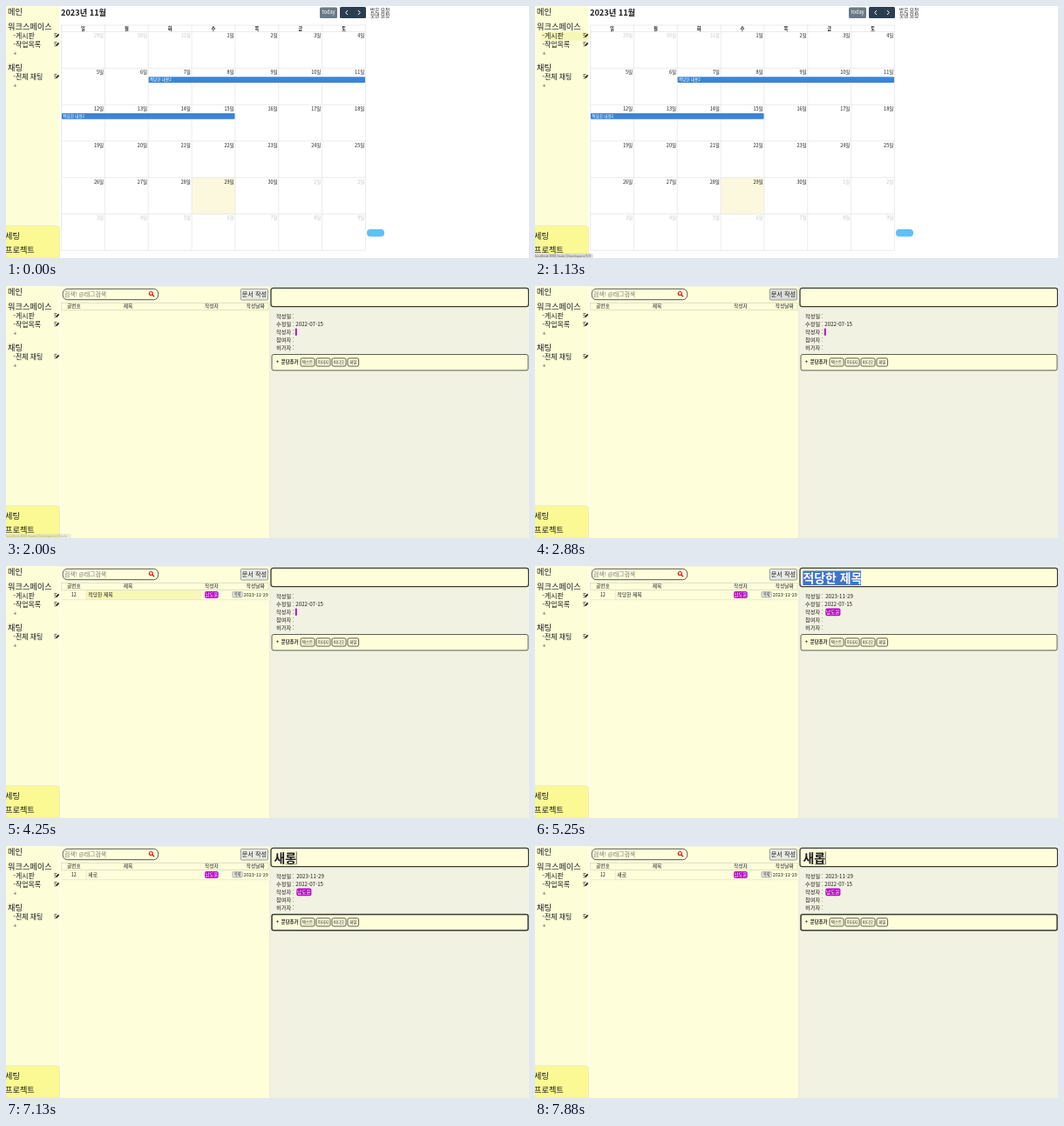
These frames come from a looping animation (600 px wide and 289 px high, 8 s). An HTML page:

```html
<!DOCTYPE html>
<html lang="ko">
<head>
<meta charset="utf-8">
<style>
html, body { margin: 0; width: 100%; height: 100%; overflow: hidden; background: #fff; }
svg { display: block; width: 600px; height: 289px; }
text { font-family: 'Noto Sans CJK KR', 'Noto Sans CJK', 'Noto Sans CJK JP', sans-serif; white-space: pre; }
</style>
</head>
<body>
<svg id="stage" viewBox="0 0 600 289"></svg>
<script>
const NS = 'http://www.w3.org/2000/svg';
const LOOP = 8000;
const stage = document.getElementById('stage');
const CREAM = '#fefedb', INK = '#1c1c1c', PURPLE = '#b50fc0';
const AUTHOR = '남도윤', DRAFT = '적당한 제목';

function add(parent, tag, attrs, str) {
  const el = document.createElementNS(NS, tag);
  for (const k in attrs) el.setAttribute(k, attrs[k]);
  if (str !== undefined) el.textContent = str;
  parent.appendChild(el);
  return el;
}
const group = (parent = stage) => add(parent, 'g', {});
const box = (p, x, y, x2, y2, fill, more = {}) =>
  add(p, 'rect', { x, y, width: x2 - x, height: y2 - y, fill, ...more });
const line = (p, d, stroke, width = 1, more = {}) =>
  add(p, 'path', { d, stroke, 'stroke-width': width, fill: 'none', ...more });
// y is the visual middle of the line
const label = (p, x, y, str, size, more = {}) =>
  add(p, 'text', { x, y: y + size * 0.37, 'font-size': size, fill: INK, ...more }, str);
const MID = { 'text-anchor': 'middle' };
const END = { 'text-anchor': 'end' };
const BOLD = { 'font-weight': 700 };
const WHITE = { fill: '#fff' };

// Calendar page
const calendar = group();
const calX = i => 63.5 + i * 49.85;
const calY = i => 29.5 + i * 41.8;

label(calendar, 63, 7.5, '2023년 11월', 9.2, BOLD);
box(calendar, 360, 1.5, 380, 14, '#6b7986', { rx: 1.5 });
label(calendar, 370, 7.3, 'today', 5.7, { ...MID, ...WHITE });
box(calendar, 383, 1, 413, 14, '#2c3e50', { rx: 1.5 });
line(calendar, 'M398 1V14', '#25364a', 0.6);
line(calendar, 'M392 5l-2.3 2.5l2.3 2.5M404 5l2.3 2.5l-2.3 2.5', '#fff', 1);

box(calendar, calX(3), calY(4), calX(4), calY(5), '#fbf8dd');
let grid = `M${calX(0)} 22H${calX(7)}`;
for (let i = 0; i < 7; i++) grid += `M${calX(0)} ${calY(i)}H${calX(7)}`;
for (let i = 0; i < 8; i++) grid += `M${calX(i)} 22V${calY(6)}`;
line(calendar, grid, '#e2e2e2', 0.7);

[...'일월화수목금토'].forEach((d, i) =>
  label(calendar, calX(i + 0.5), 25.9, d, 5.2, { ...MID, ...BOLD }));
for (let i = 0; i < 42; i++) {
  const date = new Date(2023, 9, 29 + i);
  const fill = date.getMonth() === 10 ? INK : '#c6c6c6';
  label(calendar, calX(i % 7 + 1) - 1.2, calY(Math.floor(i / 7)) + 4.8,
    date.getDate() + '일', 5.5, { ...END, fill });
}
for (const [from, to, row] of [[2, 7, 1], [0, 4, 2]]) {
  const y = calY(row) + 9.9;
  box(calendar, calX(from) + 0.4, y, calX(to) - 0.4, y + 6.8, '#3b84d6', { rx: 0.8 });
  label(calendar, calX(from) + 1.7, y + 3.4, '적당한 내용2', 4.6, WHITE);
}
label(calendar, 418, 4.8, '받은 요청', 5.6);
label(calendar, 418, 11, '보낸 요청', 5.6);
box(calendar, 414, 256, 434, 264.5, '#62bff6', { rx: 4 });
label(calendar, 424, 259.5, '· · ·', 4, { ...MID, fill: '#a5dafa' });

// Document page
const docs = group();
box(docs, 61, 0, 600, 289, CREAM);
box(docs, 303, 0, 600, 289, '#f1f2e1');
line(docs, 'M62.3 0V289', '#fff', 1.2);
line(docs, 'M302.7 0V289', '#e4e4d2', 0.8);
line(docs, 'M62 .3H600', '#e6e6d6', 0.6);

box(docs, 65.2, 3.3, 174.6, 15.7, CREAM, { rx: 5, stroke: '#444', 'stroke-width': 0.9 });
label(docs, 67, 9.2, '검색! @태그검색', 6.8, { fill: '#777' });
add(docs, 'circle', { cx: 166.3, cy: 8.5, r: 2, fill: 'none', stroke: '#e01818', 'stroke-width': 1.2 });
line(docs, 'M167.8 10L170 12.2', '#e01818', 1.4);
const newButton = box(docs, 269.4, 3.4, 300.4, 16, '#e9e9e4', { rx: 1, stroke: '#858585', 'stroke-width': 0.8 });
label(docs, 284.9, 9.7, '문서 작성', 7.1, MID);

box(docs, 63.4, 19.4, 301, 27.5, 'none', { stroke: '#d8d8bb', 'stroke-width': 0.7 });
for (const [x, str] of [[70, '글번호'], [134.7, '제목'], [228, '작성자'], [275.7, '작성날짜']])
  label(docs, x, 23.3, str, 5.7);

const row = group(docs);
const rowHover = box(row, 92.4, 28, 224, 38.6, '#f7f7b8');
line(row, 'M63 38.7H301M92.2 28V38.5', '#dedec4', 0.6);
label(row, 77.8, 33, '12', 5.5, MID);
const rowTitle = label(row, 94.3, 33, DRAFT, 5.8);
label(row, 272.8, 33, '2023-11-29', 5.45);
box(row, 260, 29.7, 271, 35.7, '#efefea', { rx: 0.8, stroke: '#777', 'stroke-width': 0.6 });
label(row, 265.5, 32.6, '삭제', 4.2, MID);
chip(row, 228, 29, 243.7, 37, 5.3);

function chip(p, x, y, x2, y2, size) {
  box(p, x, y, x2, y2, PURPLE, { rx: 2 });
  label(p, (x + x2) / 2, (y + y2) / 2 - 0.1, AUTHOR, size, { ...MID, ...WHITE });
}

box(docs, 304, 2.4, 599.5, 23.6, CREAM, { rx: 2.5, stroke: '#3a3a35', 'stroke-width': 1.3 });
const selection = box(docs, 307.3, 5.5, 374, 22, '#3f74c9');
const title = label(docs, 307.5, 13.4, '', 13.9, BOLD);
const caret = group(docs);
const caretBar = line(caret, 'M0 6.5V21', '#222', 0.7);
const caretBase = line(caret, 'M-12.6 21H0', '#555', 0.6);

['작성일 :', '수정일 : 2022-07-15', '작성자 :', '참여자 :', '허가자 :'].forEach((str, i) =>
  label(docs, 310, 34.3 + i * 9.1, str, 6.2));
const emptyChip = box(docs, 331.8, 48.6, 333.8, 57, PURPLE, { rx: 1 });
const details = group(docs);
label(details, 333.2, 34.3, '2023-11-29', 6.2);
chip(details, 333.3, 48.4, 350.4, 57.2, 5.6);

const addBar = box(docs, 305, 78.5, 599, 96.8, CREAM, { rx: 2, stroke: '#3a3a35' });
label(docs, 309.7, 87, '+', 5.5, BOLD);
label(docs, 315.7, 87, '문단추가', 5.4, BOLD);
for (const [x, x2, str] of [[338, 354, '텍스트'], [356, 372, '이미지'], [374, 390, '비디오'], [392, 404.6, '파일']]) {
  box(docs, x, 82.8, x2, 92, CREAM, { rx: 1.8, stroke: '#333', 'stroke-width': 0.8 });
  label(docs, (x + x2) / 2, 87.3, str, 4.5, MID);
}

// Sidebar
const side = group();
box(side, 0, 0, 61.3, 289, '#fdfdd8');
const hover = box(side, 7, 30, 61.3, 39.5, '#f7f7b4');
label(side, 2, 6.5, '메인', 9.2);
label(side, 2, 24, '워크스페이스', 9.2);
label(side, 2, 71, '채팅', 9.2);
for (const [y, str] of [[34, '-게시판'], [44, '-작업목록'], [81, '-전체 채팅']]) {
  label(side, 8.3, y, str, 7.9);
  line(side, `M55.3 ${y - 2.4}h3M55.3 ${y - .6}h2M55.6 ${y + 2}l1.6 -.3`, '#333', 0.8);
  line(side, `M57.5 ${y + 1.6}L60.6 ${y - 1.6}`, '#222', 1.7);
}
for (const y of [54.5, 91.5]) label(side, 8.5, y, '+', 7, { fill: '#555' });
add(side, 'path', { d: 'M0 252H57.5Q61.5 252 61.5 256V289H0Z', fill: '#fbf994', stroke: '#e6e4b0', 'stroke-width': 0.6 });
label(side, -1, 263.8, '세팅', 9.2);
label(side, -1, 280, '프로젝트', 9.2);

const status = group();
const statusBox = box(status, -2, 284.3, 66, 291, '#dcdfe2', { rx: 1.5, stroke: '#b9bcc0', 'stroke-width': 0.5 });
const statusText = label(status, 0, 286.8, '', 3.6, { fill: '#555' });

// Each track is a list of [start ms, value]
const tracks = {
  page: [[0, 'calendar'], [1250, 'docs']],
  hoverY: [[0, null], [500, 76.5], [630, 39.7], [750, 30], [1630, 39.7], [1750, null]],
  status: [[0, 0], [1000, 0.5], [1130, 1], [2000, 0.5], [2130, 0]],
  longLink: [[0, false], [1630, true]],
  button: [[0, '#e9e9e4'], [2880, '#dcdcd8'], [3000, '#e2e2dd'], [3750, '#e9e9e4']],
  row: [[0, false], [3130, true]],
  rowHover: [[0, false], [4250, true], [4750, false]],
  details: [[0, false], [4500, true]],
  selected: [[0, false], [5000, true], [5880, false]],
  barWidth: [[0, 0.8], [5380, 1.2], [5500, 1.5]],
  typed: [[0, ''], [4500, DRAFT], [5880, 'ㅅ'], [6500, '새'], [6880, '샐'], [7000, '새로'], [7130, '새롱'],
    [7250, '새로우'], [7380, '새로운'], [7500, '새로우'], [7630, '새롱'], [7750, '새로'], [7880, '새롭']],
};
const at = (name, t) => tracks[name].filter(s => s[0] <= t).pop()[1];
const show = (el, on) => el.setAttribute('visibility', on ? 'inherit' : 'hidden');

function draw(t) {
  const isDocs = at('page', t) === 'docs';
  show(calendar, !isDocs);
  show(docs, isDocs);

  const y = at('hoverY', t);
  show(hover, y !== null);
  if (y !== null) hover.setAttribute('y', y);

  const long = at('longLink', t);
  status.setAttribute('opacity', at('status', t));
  statusBox.setAttribute('width', long ? 76 : 68);
  statusText.textContent = 'localhost:3000/main/2/workspace/5/' + (long ? 'todo' : '0');

  newButton.setAttribute('fill', at('button', t));
  show(row, at('row', t));
  show(rowHover, at('row', t) && at('rowHover', t));
  const loaded = at('details', t);
  show(details, loaded);
  show(emptyChip, !loaded);
  addBar.setAttribute('stroke-width', at('barWidth', t));

  const typed = at('typed', t);
  const selected = at('selected', t);
  const typing = t >= 5880;
  title.textContent = typed;
  title.setAttribute('fill', selected ? '#fff' : INK);
  show(selection, selected);
  show(caret, typing);
  caret.setAttribute('transform', `translate(${307.6 + typed.length * 12.8} 0)`);
  // the list follows the title one step late
  rowTitle.textContent = typing ? at('typed', Math.max(t - 120, 5880)) : DRAFT;
}

const start = performance.now();
function frame() {
  draw((performance.now() - start) % LOOP);
  requestAnimationFrame(frame);
}
draw(0);
requestAnimationFrame(frame);
</script>
</body>
</html>
```
